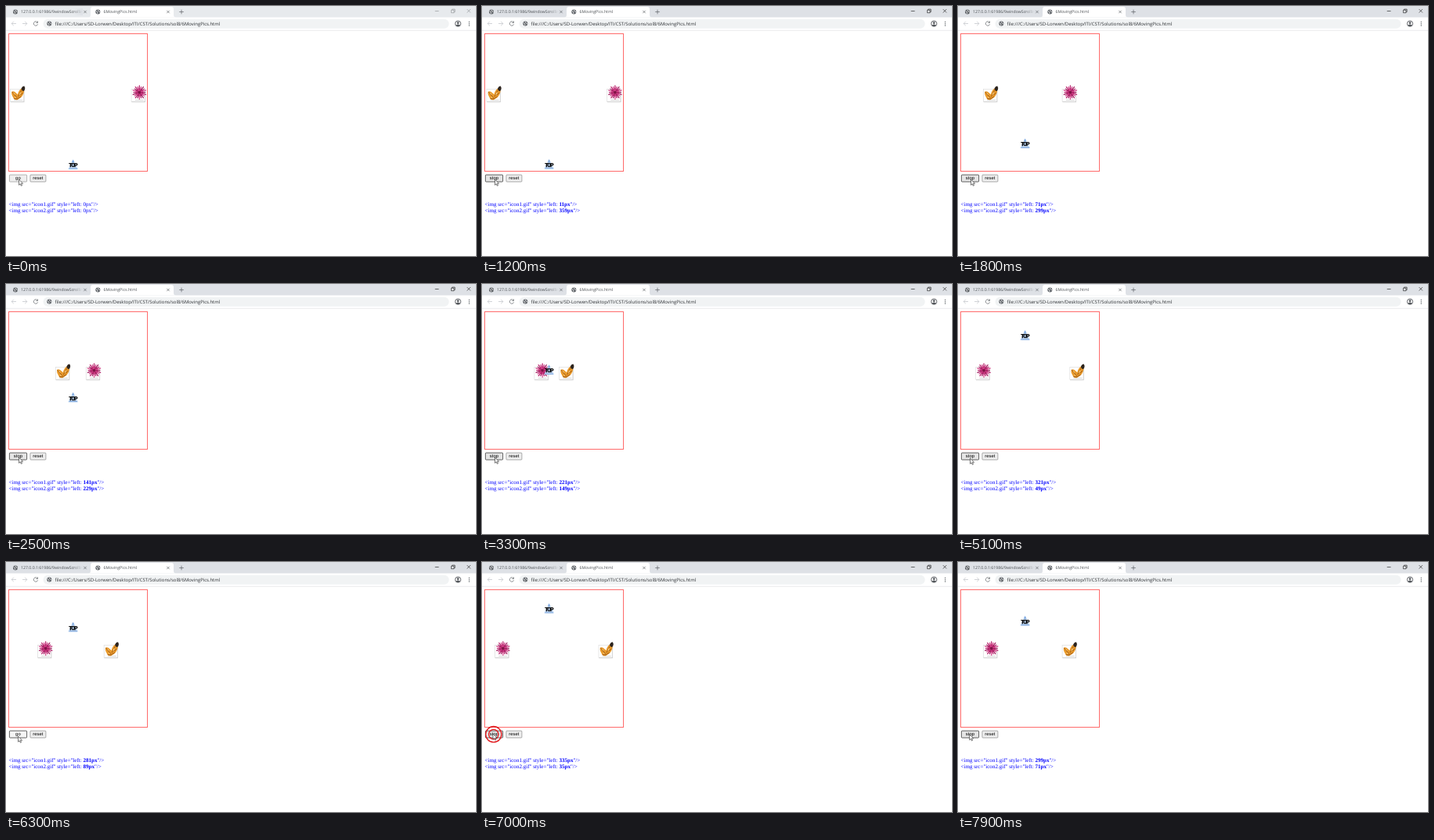
An HTML page for the animation above (8 s loop, 600x320 px).

```html
<!DOCTYPE html>
<html lang="en">
<head>
<meta charset="utf-8">
<title>Moving pictures</title>
<style>
html, body { margin: 0; width: 100%; height: 100%; overflow: hidden; background: #fff; }
svg { display: block; width: 100vw; height: 100vh; text-rendering: geometricPrecision; }
.ui { font-family: "Open Sans", "Noto Sans", sans-serif; fill: #4c5054; }
.tab { font-size: 5.2px; }
.btn { font: 5.9px "Liberation Sans", Arial, sans-serif; text-anchor: middle; fill: #000; }
.code { font: 7.06px "Liberation Serif", "Times New Roman", serif; fill: #00f; white-space: pre; }
.line { fill: none; stroke: #5f6368; stroke-width: .7; }
.pale { stroke: #bdc1c6; }
</style>
</head>
<body>
<svg viewBox="0 0 600 320">
  <defs>
    <linearGradient id="fade" x1="0" x2="1">
      <stop offset="0" stop-color="#dee1e6" stop-opacity="0"/>
      <stop offset="1" stop-color="#dee1e6"/>
    </linearGradient>
    <g id="globe">
      <circle r="3" fill="#5f6368"/>
      <path d="M-2.3-.9Q-.8-.5-.5.5T-.8 2.3M.2-2.4Q0-.9 1.2-.7T2.3.7" fill="none" stroke="#fff" stroke-width=".8"/>
    </g>
    <path id="x" class="line" d="M-1.7-1.7L1.7 1.7M1.7-1.7L-1.7 1.7"/>
    <g id="card">
      <rect x=".6" y="5.6" width="17.6" height="16" fill="#c8c8c8"/>
      <rect x=".3" y="5" width="17.2" height="15.6" fill="#fff" stroke="#dadada" stroke-width=".6"/>
      <path d="M5 18.8H16" stroke="#bbb" stroke-width=".6"/>
    </g>
  </defs>

  <rect id="strip" width="600" height="14.5"/>
  <path d="M105 14.5Q108 14.5 108 11.5V4Q108 1 111 1H211Q214 1 214 4V11.5Q214 14.5 217 14.5Z" fill="#fff"/>
  <use href="#globe" x="12" y="7.5"/>
  <use href="#globe" x="117.3" y="7.5"/>
  <text class="ui tab" x="19" y="9.3">127.0.0.1:61986/9windowScrollin</text>
  <rect x="86" y="3" width="12" height="9" fill="url(#fade)"/>
  <text class="ui tab" x="124.5" y="9.3">6MovingPics.html</text>
  <use href="#x" x="101" y="7.5"/>
  <use href="#x" x="207" y="7.5"/>
  <path class="line" d="M221.2 7.5H226.8M224 4.7V10.3"/>
  <g id="controls" fill="none" stroke-width=".6">
    <path d="M547.7 6.5H552.5M588.6 4.1L593 8.5M593 4.1L588.6 8.5"/>
    <path d="M568.4 5.2H572V8.7H568.4ZM569.5 5V4.1H573.1V7.6H572.2"/>
  </g>

  <path class="line pale" d="M13 22.5H7.2M9.8 19.8L7.1 22.5L9.8 25.2"/>
  <path class="line pale" d="M21 22.5H26.8M24.2 19.8L26.9 22.5L24.2 25.2"/>
  <path class="line" d="M40.2 20.9A2.7 2.7 0 1 0 40.6 23.3M40.5 19.4V21.5H38.4"/>
  <rect x="47.5" y="16.7" width="518" height="12" rx="6" fill="#f1f3f4"/>
  <use href="#globe" x="55.3" y="22.6"/>
  <text class="ui" x="62.6" y="24.7" font-size="5.94" style="fill:#2c2f33">file:///C:/Users/SD-Lorwen/Desktop/ITI/CST/Solutions/sol8/6MovingPics.html</text>
  <circle cx="577" cy="22.6" r="3.6" fill="#fff" stroke="#4d5156" stroke-width=".9"/>
  <circle cx="577" cy="21.6" r="1.3" fill="#4d5156"/>
  <path d="M574.4 25Q577 22.2 579.6 25Q577 27 574.4 25" fill="#4d5156"/>
  <g fill="#5f6368"><circle cx="591.3" cy="20.4" r=".7"/><circle cx="591.3" cy="22.7" r=".7"/><circle cx="591.3" cy="25" r=".7"/></g>
  <path d="M0 31.3H600" stroke="#dadce0" stroke-width=".6"/>

  <rect x="3.5" y="35.5" width="177" height="176" fill="none" stroke="#ff6b6b"/>

  <g id="butterfly">
    <use href="#card"/>
    <path d="M9 18.6Q5 19 4 15.6Q1.2 11.5 2.2 8Q5 6.6 7.6 9.6L9.8 11.6Q11 6.2 14.6 4Q18.4 3.6 17.9 8Q16.8 13.6 13 16.2Z" fill="#e99a2b"/>
    <path d="M14.2 4.6Q15.2 1 18.2.8Q19.8 3 18.6 6Q17.4 8.2 15.8 7Z" fill="#2c241e"/>
    <path d="M2.6 8.4L9 16M14.6 6L10.2 14.6M5 17L9.4 17.2L14 14.4M13 12.5L16.6 9.5" fill="none" stroke="#8f4d12" stroke-width=".8"/>
    <path d="M4.6 10L6.4 11.8M13.4 9L12.2 12M6 15L7.6 15.8" stroke="#ffe2a0"/>
  </g>
  <g id="flower"><use href="#card"/><g id="petals" stroke-linecap="round"/></g>
  <g id="top">
    <path d="M85.6 196.4L92 209H79.3Z" fill="#bcd5f3"/>
    <path d="M80.5 208.4H91" stroke="#6f9bd6" stroke-width=".8"/>
    <path d="M85.6 196.6L87.3 200H83.9Z" fill="#7fa8df"/>
    <text x="85.3" y="206.4" text-anchor="middle" letter-spacing="-1.1" font-size="7" font-weight="700" font-family="Roboto, sans-serif" stroke="#000" stroke-width=".25">TOP</text>
  </g>

  <rect id="face" x="4.4" y="216.1" width="22.2" height="8.9" rx=".9"/>
  <text id="label" class="btn" x="15.4" y="222.4"></text>
  <rect x="30.9" y="216.1" width="20" height="8.9" rx=".9" fill="#efefef" stroke="#767676" stroke-width=".6"/>
  <text class="btn" x="40.9" y="222.4">reset</text>

  <text class="code" x="3.5" y="256.2">&lt;img src="icon1.gif" style="left: <tspan id="left1"></tspan>"/&gt;</text>
  <text class="code" x="3.5" y="264.2">&lt;img src="icon2.gif" style="left: <tspan id="left2"></tspan>"/&gt;</text>

  <g id="rings" fill="none" stroke="#e0181c" stroke-width="1.3">
    <circle cx="14.8" cy="220.6" r="10.1"/>
    <circle cx="14.8" cy="220.6" r="6.2"/>
  </g>
  <path id="cursor" d="M0 0V7.2L1.7 5.7L2.8 8.2L4 7.7L2.9 5.3H5.1Z" fill="#fff" stroke="#222" stroke-width=".6"/>
</svg>
<script>
const $ = id => document.getElementById(id);
const LOOP = 8000, STEP = 100, SCALE = 0.4415, START = 10, SUM = 370;

// time, x, y of the pointer tip
const path = [
  [0, 16.5, 222], [3300, 16.5, 222], [3600, 92, 275], [3800, 108, 258],
  [4000, 102.7, 228.6], [4400, 40, 225], [4700, 15.5, 223], [6400, 15.5, 223],
  [7000, 14, 219.8], [7300, 14.6, 220.6], [LOOP, 14.6, 220.6]
];

function makePetals() {
  const n = 20, colors = ['#b8286f', '#d5478c', '#a32162'];
  let s = '<circle cx="10.6" cy="9" r="5" fill="#bd3477"/>';
  for (let i = 0; i < n; i++) {
    const r = i % 2 ? 7.4 : 8.6;
    s += `<path d="M0-2V-${r}" stroke="${colors[i % 3]}" stroke-width="1.3" transform="translate(10.6 9) rotate(${i * 360 / n})"/>`;
  }
  $('petals').innerHTML = s + '<circle cx="10.6" cy="9" r="1.8" fill="#7d1545"/>';
}

function leftAt(t) {
  if (t < 1200) return START;
  if (t < 6500) return 361 - Math.abs(Math.min(t, 5500) - 4700) / 10;
  return 362 - Math.abs(t - 7270) / 10;
}

function pointerAt(t) {
  const i = path.findIndex(p => p[0] > t);
  const [t0, x0, y0] = path[i - 1], [t1, x1, y1] = path[i];
  const k = (t - t0) / (t1 - t0);
  return [x0 + (x1 - x0) * k, y0 + (y1 - y0) * k];
}

const set = (id, attrs) => {
  for (const k in attrs) $(id).setAttribute(k, attrs[k]);
};
const move = (id, x, y) => set(id, { transform: `translate(${x} ${y})` });

function showLeft(id, value, started) {
  $(id).textContent = (started ? Math.round(value) : 0) + 'px';
  set(id, { 'font-weight': started ? 700 : 400 });
}

function render(time) {
  const t = Math.floor(time / STEP) * STEP;
  const left = leftAt(t), active = t >= 1000, started = t >= 1200;
  const running = started && (t < 5500 || t >= 6500);
  const pressed = active && !started || t >= 6300 && t < 6500;
  const [x, y] = pointerAt(t);
  const hover = active && x < 27 && y < 226;

  move('butterfly', 5.2 + (left - START) * SCALE, 101.6);
  move('flower', 5.2 + (SUM - left - START) * SCALE, 101.6);
  move('top', 0, (START - left) * SCALE);
  move('cursor', x, y);

  showLeft('left1', left, started);
  showLeft('left2', SUM - left, started);
  $('label').textContent = running ? 'stop' : 'go';
  set('face', {
    fill: pressed ? '#f5f5f5' : hover ? '#e5e5e5' : '#efefef',
    stroke: !active ? '#858585' : hover ? '#3c3c3c' : '#555',
    'stroke-width': active ? 0.8 : 0.6
  });
  set('strip', { fill: active ? '#dee1e6' : '#e7eaed' });
  set('controls', { stroke: active ? '#111' : '#8a8d91' });
  set('rings', { visibility: t >= 6700 && t < 7200 ? 'visible' : 'hidden' });
}

makePetals();
const begin = performance.now();
function tick() {
  render((performance.now() - begin) % LOOP);
  requestAnimationFrame(tick);
}
tick();
</script>
</body>
</html>
```
